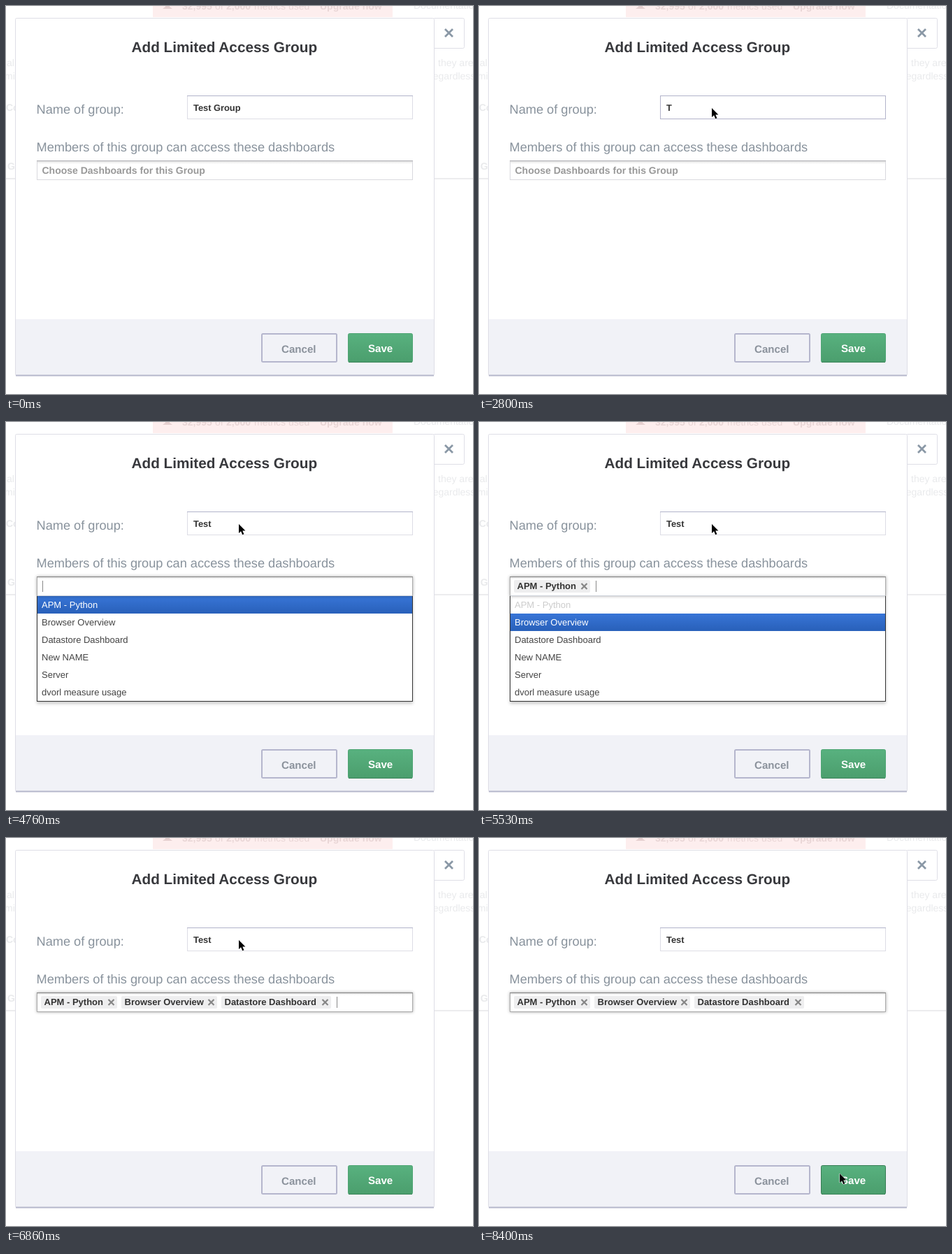
These frames come from a looping animation (668 by 555 pixels, 8820 ms). An HTML page:

```html
<!DOCTYPE html>
<html lang="en">
<head>
<meta charset="utf-8">
<title>Add Limited Access Group</title>
<style>
  html, body { margin: 0; width: 100%; height: 100%; overflow: hidden; background: #fff; }
  svg { display: block; width: 668px; height: 555px; font-family: "Liberation Sans", Arial, sans-serif; }
  text { white-space: pre; text-rendering: geometricPrecision; }
  .bold { font-weight: bold; }
  .label { font-size: 18.2px; fill: #88929c; }
  .faded { font-size: 14px; fill: #e9eaec; }
  .notice { font-size: 14px; fill: #e9d6d6; }
  .button { font-size: 15.1px; font-weight: bold; }
  .item { font-size: 13px; fill: #444; }
  .item.active { fill: #fff; }
  .item.used { fill: #ccc; }
  .chip { font-size: 13px; font-weight: bold; fill: #333; }
  .focus { filter: drop-shadow(0 0 2px rgba(0, 0, 0, .35)); }
  .drop { filter: drop-shadow(0 3px 2px rgba(0, 0, 0, .2)); }
</style>
</head>
<body>
<svg viewBox="0 0 668 555">
  <defs>
    <linearGradient id="green" x2="0" y2="1">
      <stop stop-color="#58b17f"/><stop offset="1" stop-color="#4b9e6d"/>
    </linearGradient>
    <linearGradient id="blue" x2="0" y2="1">
      <stop stop-color="#3875d7"/><stop offset=".9" stop-color="#2a62bc"/>
    </linearGradient>
    <linearGradient id="inset" x2="0" y2="1">
      <stop stop-color="#e2e2e2"/><stop offset="1" stop-color="#fff"/>
    </linearGradient>
  </defs>

  <!-- page behind the dialog -->
  <rect x="210" width="343" height="16" fill="#fdeeee"/>
  <path d="M224 4 L228 1 V-4 H234 V1 L238 4 Z" fill="#e6d0d0"/>
  <g class="notice">
    <text x="252" y="5" class="bold">32,995</text>
    <text x="299" y="5">of</text>
    <text x="315" y="5" class="bold">2,000</text>
    <text x="355" y="5">metrics used</text>
    <text x="449" y="5" class="bold">Upgrade now</text>
  </g>
  <g class="faded">
    <text x="583" y="4">Documentation</text>
    <text x="1" y="86">all</text>
    <text x="-2" y="105">mited</text>
    <text x="0" y="150" class="bold">Co</text>
    <text x="2" y="234" class="bold">G</text>
    <text x="618" y="86">they are</text>
    <text x="606" y="105">regardless</text>
  </g>
  <path d="M0 247H668" stroke="#ececee" stroke-width="2"/>

  <!-- dialog -->
  <path d="M612.5 17.5H653.5Q655.5 17.5 655.5 19.5V58.5Q655.5 60.5 653.5 60.5H612.5" fill="#fff" stroke="#dfdfe7"/>
  <rect x="13.5" y="17.5" width="599" height="511" rx="2" fill="#fff" stroke="#dedee6"/>
  <path d="M611 18.5H615V59.5H613V18.5Z" fill="#fff"/>
  <rect x="14" y="448" width="598" height="80" fill="#f1f2f7"/>
  <path d="M14 528.5H612" stroke="#b5b7cb" stroke-width="2"/>
  <path d="M628 33L639 44M639 33L628 44" stroke="#8a98a6" stroke-width="2.8"/>
  <text x="179.5" y="66" class="bold" font-size="20.75" fill="#38393d">Add Limited Access Group</text>
  <text x="43.5" y="154" class="label">Name of group:</text>
  <text x="43.5" y="208" class="label">Members of this group can access these dashboards</text>

  <!-- name field -->
  <rect id="nameBox" x="259.5" y="128.5" width="322" height="33" fill="#fff"/>
  <path d="M259 128.5H582" stroke="#b2b3ca"/>
  <rect id="nameSelection" x="268" y="137" width="68" height="16" fill="#b0d3f8"/>
  <text id="nameText" x="268" y="150" class="bold" font-size="12.85" fill="#333"></text>

  <!-- dashboard picker -->
  <g id="idleBox">
    <rect x="44.5" y="221.5" width="537" height="27" fill="#fff" stroke="#d9d9de"/>
    <rect x="45" y="222" width="536" height="4" fill="url(#inset)"/>
    <path d="M44 221.5H582" stroke="#adadb2"/>
    <rect id="hintSelection" x="52" y="227" width="233" height="16" fill="#b0d3f8"/>
    <text x="51.5" y="240" class="bold" font-size="14" fill="#999">Choose Dashboards for this Group</text>
  </g>
  <g id="list">
    <rect class="drop" x="44.5" y="248.5" width="537" height="151" fill="#fff" stroke="#333"/>
    <rect id="activeRow" x="45" width="536" height="25" fill="url(#blue)"/>
    <g id="items"></g>
  </g>
  <g id="focusBox">
    <rect class="focus" x="44.5" y="221.5" width="537" height="27" fill="#fff" stroke="#aaa"/>
    <rect x="45" y="222" width="536" height="3" fill="url(#inset)"/>
    <path d="M44 221.5H582" stroke="#858585"/>
    <path id="listSeam" d="M45 248.5H581" stroke="#cfd4dc"/>
  </g>
  <g id="chips"></g>
  <rect id="caret" y="227" width="1" height="16" fill="#888"/>

  <!-- buttons -->
  <rect x="366" y="469" width="107" height="40" rx="1.5" fill="#f1f2f7" stroke="#b5b6cd" stroke-width="2"/>
  <text x="394" y="496" class="button" fill="#8b929c">Cancel</text>
  <rect id="saveBox" x="489.5" y="468.5" width="92" height="41" rx="2" fill="url(#green)"/>
  <path d="M490 509.5H581" stroke="#3a8459"/>
  <text x="518" y="495" class="button" fill="#fff">Save</text>

  <path id="pointer" d="M1 1V14L4.1 11.2L6.2 16.2L8.4 15.2L6.3 10.4H10.4Z"
    fill="#000" stroke="#fff" stroke-width="1" paint-order="stroke"/>
</svg>
<script>
const LOOP = 8820, TICK = 70;
const $ = id => document.getElementById(id);
const show = (id, on) => $(id).setAttribute('display', on ? 'inline' : 'none');
const set = (id, attrs) => { for (const k in attrs) $(id).setAttribute(k, attrs[k]); };

// Value of the last [time, value] step reached
const at = (steps, t) => steps.reduce((v, [time, value]) => t >= time ? value : v, steps[0][1]);

const options = ['APM - Python', 'Browser Overview', 'Datastore Dashboard', 'New NAME', 'Server', 'dvorl measure usage'];
const chipSpans = [[50, 159], [165, 302], [308, 465]];
const caretX = [52, 167, 310, 473];

const nameSteps = [[0, 'Test Group'], [2800, 'T'], [3010, 'Te'], [3150, 'Tes'], [3360, 'Test']];
const chipSteps = [[0, 0], [5250, 1], [6020, 2], [6860, 3]];
const listSteps = [[0, false], [3710, true], [5250, false], [5530, true], [6020, false], [6370, true], [6860, false]];
const caretSteps = [[0, false], [3710, true], [4270, false], [4760, true], [8400, false]];

const arrival = [[340, 24], [340, 33], [339, 49], [338, 70], [336, 93], [334, 114], [332, 130], [330, 141], [330, 146], [332, 145]];
const rest = [332, 145], overSave = [516, 477], final = [515, 479];

$('items').innerHTML = options.map((name, i) =>
  `<text class="item" x="51" y="${266 + 25 * i}">${name}</text>`).join('');

$('chips').innerHTML = chipSpans.map(([left, right], i) => {
  const x = right - 12.5;
  return `<g><rect x="${left}" y="226" width="${right - left}" height="18" rx="2" fill="#eeeeef"/>
    <text class="chip" x="${left + 4.5}" y="239">${options[i]}</text>
    <path d="M${x} 231l8 8m0 -8l-8 8" stroke="#858585" stroke-width="2.2"/></g>`;
}).join('');

function pointerAt(t) {
  if (t < 210) return null;
  if (t < 840) return arrival[Math.floor((t - 210) / TICK)];
  if (t < 7140) return rest;
  if (t >= 8120) return final;
  const p = Math.min(1, (Math.floor((t - 7140) / TICK) + 1) / 12);
  const eased = p * p * (3 - 2 * p);
  return rest.map((a, i) => Math.round(a + (overSave[i] - a) * eased));
}

function render(t) {
  const count = at(chipSteps, t), open = at(listSteps, t), picking = t >= 3710;

  $('nameText').textContent = at(nameSteps, t);
  set('nameBox', { stroke: t >= 1120 && t < 3640 ? '#b2b3ca' : '#dddde5' });
  show('nameSelection', t >= 1190 && t < 2800);

  show('idleBox', !picking);
  show('hintSelection', t >= 3640);
  show('focusBox', picking);
  show('list', open);
  show('listSeam', open);
  set('activeRow', { y: 249 + 25 * count });
  [...$('items').children].forEach((el, i) => {
    el.setAttribute('class', 'item' + (i < count ? ' used' : i === count ? ' active' : ''));
  });
  [...$('chips').children].forEach((el, i) => el.setAttribute('display', i < count ? 'inline' : 'none'));
  show('caret', at(caretSteps, t));
  set('caret', { x: caretX[count] });

  const tip = pointerAt(t);
  show('pointer', tip);
  if (tip) set('pointer', { transform: `translate(${tip})` });
  const hover = tip && tip[0] >= 488 && tip[1] >= 467;
  set('saveBox', { stroke: hover ? '#357c53' : '#4fa574' });
}

const start = performance.now();
function frame() {
  render((performance.now() - start) % LOOP);
  requestAnimationFrame(frame);
}
render(0);
requestAnimationFrame(frame);
</script>
</body>
</html>
```
